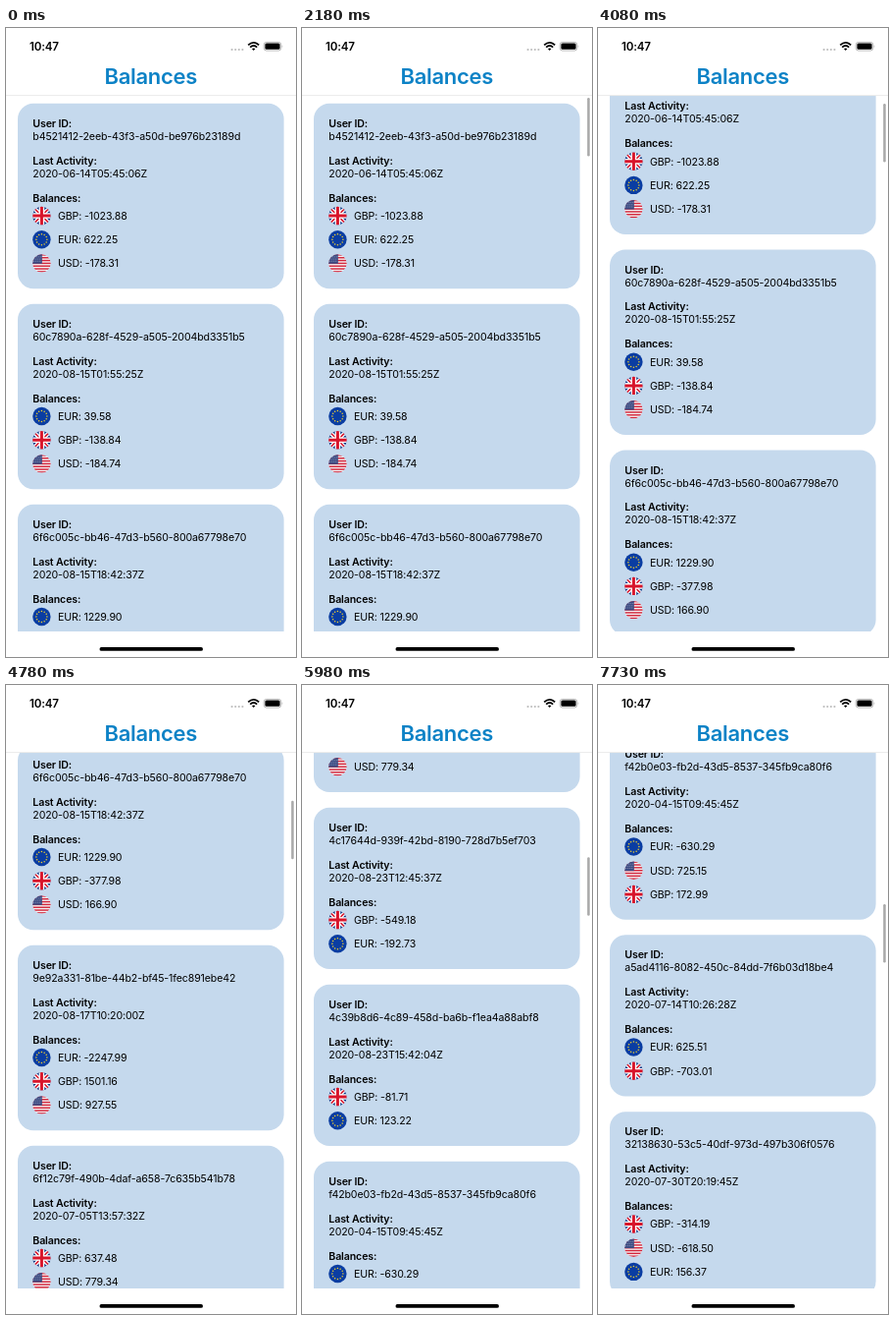
These frames come from a looping animation (296 px wide and 640 px high, 7770 ms). An HTML page:

```html
<!DOCTYPE html>
<html lang="en">
<head>
<meta charset="utf-8">
<title>Balances</title>
<style>
  html, body { margin: 0; width: 100%; height: 100%; overflow: hidden; background: #fff; }
  svg { display: block; }
  text { font: 400 10.6px Inter, Roboto, sans-serif; letter-spacing: -.12px; fill: #000; }
  .label { font-weight: 600; }
  .clock { font-size: 11.6px; font-weight: 600; letter-spacing: -.15px; }
  .title { font-size: 22px; font-weight: 600; letter-spacing: -.3px; fill: #0c82c6; text-anchor: middle; }
</style>
</head>
<body>
<svg width="296" height="640" viewBox="0 0 296 640">
  <defs>
    <clipPath id="view"><rect y="69" width="296" height="545"/></clipPath>
    <clipPath id="round"><circle r="9.2"/></clipPath>
    <g id="GBP" clip-path="url(#round)">
      <rect x="-10" y="-10" width="20" height="20" fill="#0b3283"/>
      <path d="M-10-10 10 10M10-10-10 10" stroke="#fff" stroke-width="4"/>
      <path d="M-10-10 10 10M10-10-10 10" stroke="#d8152b" stroke-width="1.5"/>
      <path d="M0-10V10M-10 0H10" stroke="#fff" stroke-width="5.6"/>
      <path d="M0-10V10M-10 0H10" stroke="#d8152b" stroke-width="3"/>
    </g>
    <g id="EUR">
      <circle r="9.2" fill="#0a3da2"/>
      <g id="stars" fill="#f5d32c"></g>
    </g>
    <g id="USD" clip-path="url(#round)">
      <rect x="-10" y="-10" width="20" height="20" fill="#f4f1f3"/>
      <g id="stripes" fill="#d3243a"></g>
      <rect x="-10" y="-10" width="10.4" height="10.4" fill="#3c4b82"/>
      <path d="M-7-6.5H0M-8-4.3H0M-8-2.1H0" stroke="#c3cae0" stroke-width=".7" stroke-dasharray=".8 1.2"/>
    </g>
  </defs>

  <g clip-path="url(#view)"><g id="list"></g></g>
  <rect id="bar" x="291.2" y="71" width="2.5" height="59.5" rx="1.25" fill="#a8a8a8"/>

  <path d="M0 68.6H296" stroke="#e4e4e4" stroke-width=".8"/>
  <text class="title" x="147.8" y="57">Balances</text>
  <text class="clock" x="24" y="22.8">10:47</text>
  <g fill="#bdbdbd">
    <circle cx="230.6" cy="22" r="1.1"/><circle cx="234.2" cy="22" r="1.1"/>
    <circle cx="237.8" cy="22" r="1.1"/><circle cx="241.4" cy="22" r="1.1"/>
  </g>
  <g fill="none" stroke="#000" stroke-width="1.8">
    <path d="M247.2 17.4Q252.7 12.4 258.2 17.4M249.2 19.7Q252.7 16.4 256.2 19.7"/>
    <path d="M251 21.2Q252.7 19.8 254.4 21.2L252.7 23Z" fill="#000" stroke="none"/>
  </g>
  <rect x="263.2" y="14.4" width="17.6" height="8.6" rx="2.6" fill="none" stroke="#a5a5a5" stroke-width=".8"/>
  <rect x="264.4" y="15.6" width="15.2" height="6.2" rx="1.5"/>
  <path d="M281.7 17.2q1.3 1.5 0 3z" fill="#a5a5a5"/>
  <rect x="95.5" y="630" width="105.5" height="3.8" rx="1.9"/>
</svg>

<script>
(() => {
const LOOP = 7770;
const $ = id => document.getElementById(id);

const cards = [
  ["b4521412-2eeb-43f3-a50d-be976b23189d", "2020-06-14T05:45:06Z", "GBP: -1023.88", "EUR: 622.25", "USD: -178.31"],
  ["60c7890a-628f-4529-a505-2004bd3351b5", "2020-08-15T01:55:25Z", "EUR: 39.58", "GBP: -138.84", "USD: -184.74"],
  ["6f6c005c-bb46-47d3-b560-800a67798e70", "2020-08-15T18:42:37Z", "EUR: 1229.90", "GBP: -377.98", "USD: 166.90"],
  ["9e92a331-81be-44b2-bf45-1fec891ebe42", "2020-08-17T10:20:00Z", "EUR: -2247.99", "GBP: 1501.16", "USD: 927.55"],
  ["6f12c79f-490b-4daf-a658-7c635b541b78", "2020-07-05T13:57:32Z", "GBP: 637.48", "USD: 779.34"],
  ["4c17644d-939f-42bd-8190-728d7b5ef703", "2020-08-23T12:45:37Z", "GBP: -549.18", "EUR: -192.73"],
  ["4c39b8d6-4c89-458d-ba6b-f1ea4a88abf8", "2020-08-23T15:42:04Z", "GBP: -81.71", "EUR: 123.22"],
  ["f42b0e03-fb2d-43d5-8537-345fb9ca80f6", "2020-04-15T09:45:45Z", "EUR: -630.29", "USD: 725.15", "GBP: 172.99"],
  ["a5ad4116-8082-450c-84dd-7f6b03d18be4", "2020-07-14T10:26:28Z", "EUR: 625.51", "GBP: -703.01"],
  ["32138630-53c5-40df-973d-497b306f0576", "2020-07-30T20:19:45Z", "GBP: -314.19", "USD: -618.50", "EUR: 156.37"]
];

// Flag details
for (let i = 0; i < 12; i++) {
  const a = i * Math.PI / 6;
  $("stars").innerHTML += `<circle cx="${5.5 * Math.sin(a)}" cy="${5.5 * Math.cos(a)}" r=".75"/>`;
}
for (let i = 0; i < 7; i++) {
  $("stripes").innerHTML += `<rect x="-10" y="${-9.2 + i * 2.83}" width="20" height="1.42"/>`;
}

// Cards, stacked from the top of the list
const line = (y, str, cls = "") => `<text class="${cls}" x="27.3" y="${y}">${str}</text>`;
let nextY = 76.8;
$("list").innerHTML = cards.map(([id, date, ...rows]) => {
  const h = 115.8 + rows.length * 24.2, y = nextY;
  nextY += rows.length > 2 ? 204 : 180;
  return `<g class="card" data-mid="${y + h / 2}">
    <rect x="12" y="${y}" width="271.6" height="${h}" rx="16" fill="#c5d9ed"/>` +
    line(y + 24, "User ID:", "label") + line(y + 37, id) +
    line(y + 61.8, "Last Activity:", "label") + line(y + 74.8, date) +
    line(y + 99.8, "Balances:", "label") +
    rows.map((row, i) => {
      const cy = y + 114.2 + i * 24.2;
      return `<use href="#${row.slice(0, 3)}" x="36.4" y="${cy}"/>
        <text x="53" y="${cy + 3.8}">${row}</text>`;
    }).join("") + "</g>";
}).join("");
const [first, second] = document.querySelectorAll(".card");

// The picture holds between these moments
const steps = [
  0, 1460, 1570, 1700, 1950, 2060, 2170, 2280, 2380, 2490, 2600, 2950, 3260, 3370,
  3880, 3980, 4090, 4190, 4300, 4400, 4550, 4660, 4780, 4880, 4990, 5090, 5200, 5300,
  5420, 5530, 5640, 5760, 5870, 5980, 6110, 6220, 6330, 6440, 6560, 6670, 6790, 6900,
  7020, 7140, 7260, 7370, 7490, 7610, 7730
];

// [time, value, slope]; without a slope the track is linear
const pressFirst = [[1459, 0], [1460, 1], [1840, 1], [2170, 0]];
const pressSecond = [[2270, 0], [2600, 1], [2940, 1], [2950, .2], [3250, .2], [3370, 0]];
const scrollKeys = [[3780, 0, .2], [4780, 424, .45], [5980, 948, .44], [6670, 1257.5, .33], [7730, 1382.5, 0]];

function track(keys, t) {
  if (t <= keys[0][0]) return keys[0][1];
  const i = keys.findIndex(k => k[0] >= t);
  if (i < 0) return keys[keys.length - 1][1];
  const [t0, v0, m0] = keys[i - 1], [t1, v1, m1] = keys[i];
  const d = t1 - t0, u = (t - t0) / d;
  if (m0 === undefined) return v0 + (v1 - v0) * u;
  const s = u * u * (3 - 2 * u);
  return v0 + (v1 - v0) * s + d * u * (1 - u) * (m0 * (1 - u) - m1 * u);
}

function press(card, p) {
  const mid = card.dataset.mid, k = 1 - .05 * p;
  card.setAttribute("transform", `translate(147.8 ${mid}) scale(${k}) translate(-147.8 ${-mid})`);
  card.setAttribute("opacity", 1 - .3 * p);
}

function draw(now) {
  const clock = now % LOOP;
  const t = steps.filter(s => s <= clock).pop() || 0;
  const p1 = track(pressFirst, t), p2 = track(pressSecond, t);
  press(first, p1);
  press(second, p2);
  const offset = track(scrollKeys, t) - Math.round(Math.max(p1, p2));
  $("list").setAttribute("transform", `translate(0 ${-offset})`);
  $("bar").setAttribute("transform", `translate(0 ${Math.max(0, offset) * .11})`);
  $("bar").setAttribute("opacity", t < 1460 ? 0 : 1);
}

const start = performance.now();
function tick() {
  draw(performance.now() - start);
  requestAnimationFrame(tick);
}
tick();
})();
</script>
</body>
</html>
```
